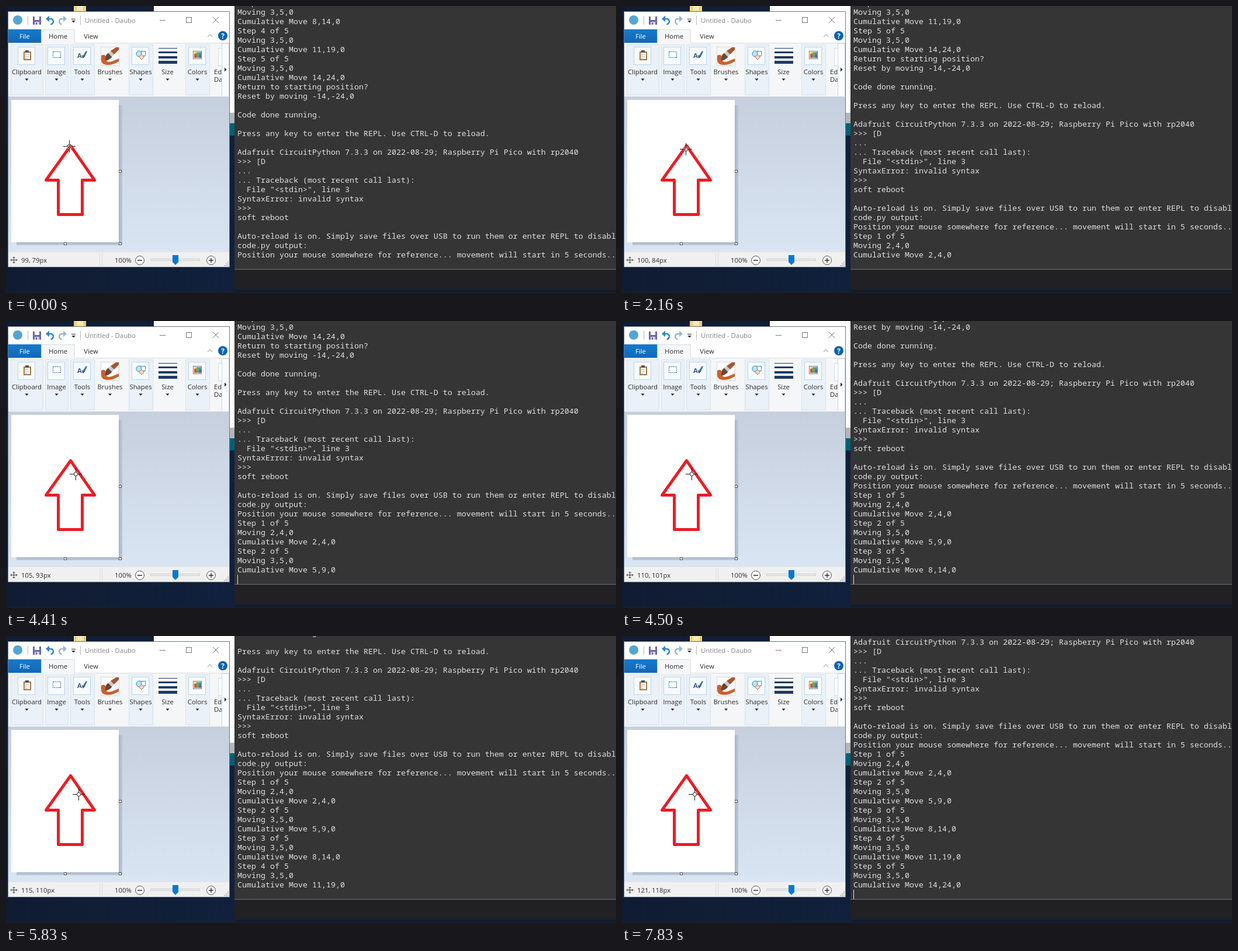
These frames come from a looping animation (1044x492 px, 8 s). An HTML page:

```html
<!DOCTYPE html>
<html lang="en">
<head>
<meta charset="utf-8">
<title>Mouse steps</title>
<style>
  html, body { margin: 0; width: 100%; height: 100%; overflow: hidden; background: #0f1d37; }
  svg { display: block; width: 1044px; height: 492px; }
  .crisp { shape-rendering: crispEdges; }
  .ui { font: 11.3px "Open Sans", "Noto Sans", sans-serif; fill: #2b2b2b; }
  .mid { text-anchor: middle; }
  .term { font: 13.333px "Noto Sans Mono", "DejaVu Sans Mono", monospace; fill: #e0e0e0; }
  .line { fill: none; stroke: #444; }
  .turn { fill: currentColor; stroke: currentColor; }
</style>
</head>
<body>
<svg viewBox="0 0 1044 492">
  <defs>
    <linearGradient id="desk" x2="1" y2="0"><stop stop-color="#101c32"/><stop offset="1" stop-color="#11264b"/></linearGradient>
    <linearGradient id="work" x2="0" y2="1"><stop stop-color="#c6cfde"/><stop offset="1" stop-color="#dae5f3"/></linearGradient>
    <linearGradient id="file" x2="0" y2="1"><stop stop-color="#1979ca"/><stop offset="1" stop-color="#1268b8"/></linearGradient>
    <clipPath id="output"><rect x="391" y="0" width="653" height="436"/></clipPath>
    <g id="turn" class="turn">
      <path d="M71 22h4.500c7 0 7 8 1 9.500" fill="none" stroke-width="2.500"/>
      <path d="M68 22l6-5.500v11z" stroke="none"/>
    </g>
  </defs>

  <!-- desktop -->
  <g class="crisp">
    <rect width="1044" height="492" fill="url(#desk)"/>
    <path d="M116 0h21v10h-21z" fill="#ecd27f"/>
    <path d="M121 0h11v8h-11z" fill="#f7e9b4"/>
    <path d="M253 0h139v183H253z" fill="#fdfdfd"/>
    <path d="M382 183h10v18h-10z" fill="#b3b7ba"/>
    <path d="M382 201h10v21h-10z" fill="#006277"/>
    <path d="M391 486h653v6H391z" fill="#121c30"/>
    <path d="M0 490h1044v2H0z" fill="#171f2b"/>
  </g>

  <!-- drawing window -->
  <g class="crisp">
    <rect x="3" y="9" width="380" height="439" fill="#6d7787"/>
    <rect x="4" y="10" width="378" height="437" fill="#fff"/>
    <rect x="4" y="63" width="378" height="93" fill="#f5f6f7"/>
    <path d="M4 63.500H60.500V40.500H117.500V63.500H382" fill="#f5f6f7" stroke="#dadbdc"/>
    <path d="M4 155.500H382" stroke="#d2d5da"/>
    <rect x="4" y="40" width="56" height="23" fill="url(#file)"/>
    <rect x="4" y="156" width="378" height="265" fill="url(#work)"/>
    <path d="M193 170h6v240H18v-5h175z" fill="#b8c4d4"/>
    <path d="M193 170h3v237H18v-2h175z" fill="#adb9ca"/>
    <rect x="9" y="161" width="184" height="244" fill="#fff"/>
    <path d="M193.500 281.500h4v4h-4zM99.500 405.500h4v4h-4zM193.500 405.500h4v4h-4z" fill="#fff" stroke="#555"/>
    <rect x="4" y="421" width="378" height="26" fill="#f0f0f0"/>
    <path d="M4 421.500H382" stroke="#e2e4e7"/>
    <path d="M160.500 424v22M164.500 424v22" stroke="#dcdcdc"/>
  </g>

  <!-- title bar -->
  <circle cx="20" cy="24" r="8" fill="#55a5d3"/>
  <g class="crisp">
    <path d="M37.500 17v15M127.500 17v15" stroke="#b5b5b5"/>
    <path d="M46 18h14v14H46z" fill="#6c64ad"/>
    <path d="M49 18h8v6h-8z" fill="#fff"/>
    <path d="M49 27h8v5h-8z" fill="#d8d6ec"/>
    <path d="M51 28h2v4h-2z" fill="#6c64ad"/>
    <path d="M112 22.500h7" stroke="#333"/>
    <path d="M263 24.500h10M308.500 19.500h9v9h-9z" fill="none" stroke="#777"/>
  </g>
  <path d="M112 25h7l-3.500 3.500z" fill="#333"/>
  <path d="M354 19l10 10m0-10l-10 10" stroke="#777"/>
  <use href="#turn" color="#2f87c8"/>
  <use href="#turn" color="#9ab9d0" transform="matrix(-1 0 0 1 172 0)"/>
  <text class="ui" x="135" y="29" style="fill:#858585">Untitled - Daubo</text>

  <!-- tabs -->
  <g class="ui">
    <text class="mid" x="32" y="56" style="fill:#fff">File</text>
    <text class="mid" x="89" y="56">Home</text>
    <text class="mid" x="145.500" y="56">View</text>
  </g>
  <path d="M345 53l4-4 4 4" fill="none" stroke="#888"/>
  <circle cx="371" cy="51" r="8" fill="#0863b1"/>
  <text class="ui mid" x="371" y="55.500" style="fill:#fff;font-weight:700;font-size:12px">?</text>

  <g id="groups"></g>

  <!-- ribbon icons -->
  <g class="crisp">
    <path d="M30.500 78.500h11v13h-11z" fill="#fff" stroke="#a8743d" stroke-width="2"/>
    <path d="M33 76h6v4h-6z" fill="#555"/>
    <path d="M33 83.500h6M33 86.500h6M33 89.500h4" stroke="#a9b9cc"/>
    <path d="M80.500 78.500h13v10h-13z" fill="#fff" stroke="#2f72b5" stroke-dasharray="2 1"/>
    <path d="M261 72.500h32" stroke="#1e3a63"/>
    <path d="M261 79.500h32" stroke="#1e3a63" stroke-width="3"/>
    <path d="M261 87.500h32" stroke="#1e3a63" stroke-width="4"/>
    <path d="M261 96.500h32" stroke="#1e3a63" stroke-width="5"/>
    <path d="M320.500 77.500h14v13h-14z" fill="#fff" stroke="#777"/>
    <path d="M322 79h4v10h-4z" fill="#e5484b"/>
    <path d="M326 79h4v10h-4z" fill="#4fb857"/>
    <path d="M330 79h4v10h-4z" fill="#7757c8"/>
    <path d="M322 79h4v3h-4z" fill="#f3cf3d"/>
    <path d="M330 79h4v4h-4z" fill="#3d9cd9"/>
  </g>
  <text class="ui" x="122" y="89" style="fill:#345a91;font-weight:700">A</text>
  <path d="M131 86l6-9 2 1-4 9z" fill="#3b78b7"/>
  <path d="M130 84l5 3-4 3z" fill="#555"/>
  <rect x="162.500" y="70.500" width="31" height="32" fill="#fbfbfb" stroke="#d5d9de"/>
  <path d="M163 85c5-3 9 0 8 5s4 7 10 5l12-5v5c-9 6-20 8-27 4-4-3-3-9-3-14z" fill="#c9622f"/>
  <path d="M170 90q0-7 6-10l6 6q-3 6-12 8z" fill="#6b4536"/>
  <path d="M175 81l4-4 6 6-4 4z" fill="#c8cbd0"/>
  <path d="M179 77l9-6h5v4l-8 8z" fill="#a95531"/>

  <circle cx="228" cy="82" r="5" fill="#bfe2f5" stroke="#3587bd"/>
  <path d="M231.500 77.500h7v8h-7z" fill="#fff" stroke="#2b9b94"/>
  <path d="M232 83l4.500 4.500-4.500 4.500-4.500-4.500z" fill="#f5d4c8" stroke="#c56a46"/>

  <rect class="crisp" x="369.500" y="64.500" width="12" height="91" fill="#fafcfe" stroke="#c5d9e8"/>
  <path d="M374 105.500l3.500 3.500-3.500 3.500z" fill="#222"/>

  <!-- status bar -->
  <path class="line" d="M8 435.500h11M13.500 430v11M10 433.500l-2 2 2 2M17 433.500l2 2-2 2M11.500 432l2-2 2 2M11.500 439l2 2 2-2"/>
  <text class="ui" id="status" x="26" y="440"></text>
  <text class="ui" x="186" y="440">100%</text>
  <g fill="#fafafa" stroke="#555"><circle cx="229" cy="436" r="7.500"/><circle cx="351" cy="436" r="7.500"/></g>
  <path d="M225 436h8M347 436h8M351 432v8" stroke="#333" stroke-width="1.500"/>
  <rect class="crisp" x="247.500" y="433.500" width="84" height="3" fill="#e7eaea" stroke="#d1d1d1"/>
  <path d="M285 427h10v12l-5 5-5-5z" fill="#0878d3"/>
  <path class="crisp" d="M379 438h2v2h-2zm0 3h2v2h-2zm0 3h2v2h-2zm-3-3h2v2h-2zm0 3h2v2h-2zm-3 0h2v2h-2z" fill="#bbb"/>

  <!-- canvas drawing -->
  <path d="M110.500 239.500L151.500 298.500H130.500V357.500H89.500V298.500H68.500Z" fill="none" stroke="#ed1c24" stroke-width="5" stroke-linejoin="round"/>
  <g id="pointer" fill="none" stroke="#1c1c1c">
    <circle cx=".5" cy=".5" r="3.200" stroke="#fff" stroke-width="3" opacity=".6"/>
    <path class="crisp" d="M-10 .5H-3M4 .5H11M.5-10V-3M.5 4V11"/>
    <circle cx=".5" cy=".5" r="3.200"/>
  </g>

  <!-- terminal -->
  <g class="crisp">
    <rect x="391" width="653" height="486" fill="#212123"/>
    <rect x="391" width="653" height="451" fill="#353535"/>
    <path d="M391 451.500H1044" stroke="#727272"/>
  </g>
  <g clip-path="url(#output)"><g id="lines" class="term"></g></g>
  <rect id="caret" class="crisp" x="396" y="435" width="1" height="16" fill="#e8e8e8"/>
</svg>

<script>
const $ = id => document.getElementById(id);
const NS = "http://www.w3.org/2000/svg";

function add(parent, tag, attrs, text = "") {
  const el = document.createElementNS(NS, tag);
  for (const key in attrs) el.setAttribute(key, attrs[key]);
  el.textContent = text;
  return parent.appendChild(el);
}

// Ribbon groups: label, left, right, framed
const groups = [
  ["Clipboard", 8, 63, true], ["Image", 67, 106, true], ["Tools", 110, 151, true], ["Brushes", 158, 198, false],
  ["Shapes", 210, 251, true], ["Size", 262, 291, false], ["Colors", 307, 348, true]
];
const ribbon = $("groups");
for (const [label, left, right, framed] of groups) {
  const mid = (left + right) / 2;
  if (framed) {
    add(ribbon, "rect", { class: "crisp", x: left + .5, y: 66.5, width: right - left, height: 86, fill: "#eaf1f8", stroke: "#d5e4f0" });
    add(ribbon, "rect", { class: "crisp", x: Math.floor(mid) - 14.5, y: 70.5, width: 29, height: 30, fill: "#f6fafd", stroke: "#b9d5e9" });
  }
  add(ribbon, "text", { class: "ui mid", x: mid, y: 117 }, label);
  add(ribbon, "path", { d: `M${mid - 3} 124.500h6l-3 3.500z`, fill: "#222" });
}
add(ribbon, "rect", { class: "crisp", x: 363.5, y: 72.5, width: 6, height: 30, fill: "#fff", stroke: "#cddbe6" });
add(ribbon, "text", { class: "ui", x: 356, y: 117 }, "Ed");
add(ribbon, "text", { class: "ui", x: 356, y: 130 }, "Da");

// Terminal output
const step = (n, move, total) => [`Step ${n} of 5`, `Moving ${move},0`, `Cumulative Move ${total},0`];
const steps = [["2,4", "2,4"], ["3,5", "5,9"], ["3,5", "8,14"], ["3,5", "11,19"], ["3,5", "14,24"]]
  .map(([move, total], i) => step(i + 1, move, total));
const log = [
  ...steps.slice(2).flat(),
  "Return to starting position?",
  "Reset by moving -14,-24,0",
  "",
  "Code done running.",
  "",
  "Press any key to enter the REPL. Use CTRL-D to reload.",
  "",
  "Adafruit CircuitPython 7.3.3 on 2022-08-29; Raspberry Pi Pico with rp2040",
  ">>> [D",
  "...",
  "... Traceback (most recent call last):",
  "\u00a0\u00a0File \"<stdin>\", line 3",
  "SyntaxError: invalid syntax",
  ">>>",
  "soft reboot",
  "",
  "Auto-reload is on. Simply save files over USB to run them or enter REPL to disable.",
  "code.py output:",
  "Position your mouse somewhere for reference... movement will start in 5 seconds...",
  ...steps.flat()
];
log.forEach((line, i) => add($("lines"), "text", { x: 396, y: 16 * i - 1 }, line));

// Timeline
const LOOP = 8000;
const spots = [[99, 79], [100, 84], [105, 93], [110, 101], [115, 110], [121, 118]];
const moveTimes = [1830, 3160, 4410, 5580, 6910];
const printTimes = [1910, 3250, 4500, 5750, 7080];
const caretToggles = [580, 1000, 1410, 1910, 2410, 2830, 3200, 3790, 4250, 4790, 5200, 5580, 6000, 6540, 7080, 7410, 7790];
const passed = (times, t) => times.filter(time => time <= t).length;

function draw() {
  const t = performance.now() % LOOP;
  const [x, y] = spots[Math.min(passed(moveTimes, t), 4)];
  const printed = passed(printTimes, t);
  const pointer = passed(moveTimes, t) === 0 ? spots[0] : [x, y];
  $("pointer").setAttribute("transform", `translate(${pointer[0] + 9} ${pointer[1] + 161})`);
  $("status").textContent = spots[printed].join(", ") + "px";
  $("lines").setAttribute("transform", `translate(0 ${-48 * printed})`);
  $("caret").style.opacity = passed(caretToggles, t) % 2;
  requestAnimationFrame(draw);
}
draw();
</script>
</body>
</html>
```
